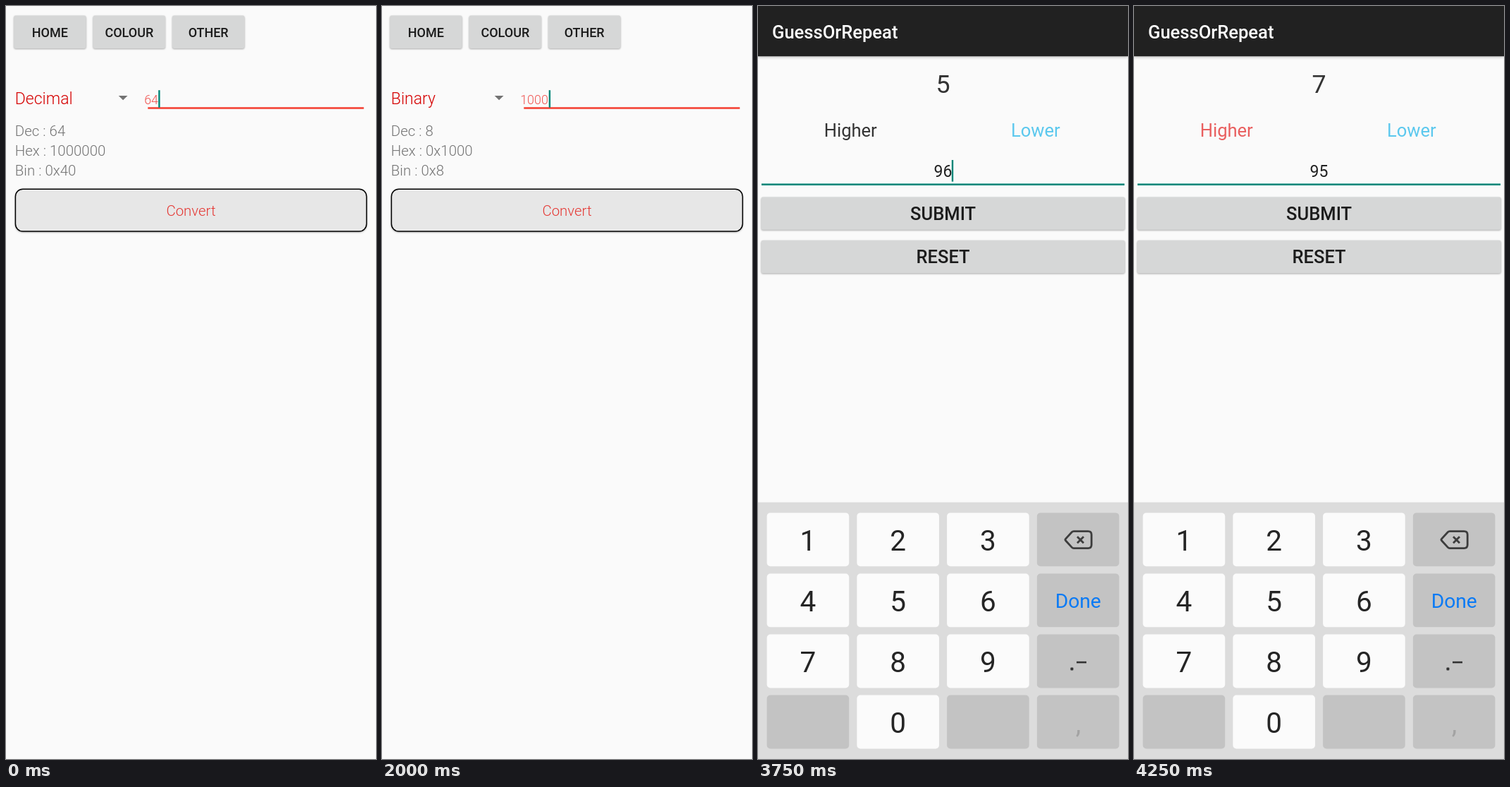
Recreate the animation shown at these times as an HTML page. Size 525 px wide and 1066 px high, loop 4.5 s.

```html
<!DOCTYPE html>
<html lang="en">
<head>
<meta charset="utf-8">
<title>Number tools</title>
<style>
  html, body { margin: 0; width: 100%; height: 100%; overflow: hidden; background: #fafafa; }
  svg { display: block; width: 100%; height: 100%; font-family: Roboto, sans-serif; }
  .mid { text-anchor: middle; }
  .light { font-weight: 300; }
  .btn { fill: #d6d7d7; filter: drop-shadow(0 1px 1.1px rgba(0, 0, 0, .32)); }
  .cap { fill: #1b1b1b; font-weight: 500; text-anchor: middle; }
  .accent { fill: #008577; }

  /* Each part shows for a share of the 4.5 s loop, shifted by its own delay. */
  .part { visibility: hidden; animation: 4500ms step-end infinite; }
  .t3000 { animation-name: t3000; }
  .t1500 { animation-name: t1500; }
  .t1000 { animation-name: t1000; }
  .t250 { animation-name: t250; }
  @keyframes t3000 { 0% { visibility: visible } 66.66667%, 100% { visibility: hidden } }
  @keyframes t1500 { 0% { visibility: visible } 33.33334%, 100% { visibility: hidden } }
  @keyframes t1000 { 0% { visibility: visible } 22.22223%, 100% { visibility: hidden } }
  @keyframes t250 { 0% { visibility: visible } 5.55556%, 100% { visibility: hidden } }
</style>
</head>
<body>
<svg id="stage" viewBox="0 0 525 1066"></svg>
<script>
const LOOP = 4500;

const text = (x, y, size, fill, str, cls = '') =>
  `<text x="${x}" y="${y}" font-size="${size}" fill="${fill}" class="${cls}">${str}</text>`;
const rect = (x, y, w, h, fill, r = 0) =>
  `<rect x="${x}" y="${y}" width="${w}" height="${h}" rx="${r}" fill="${fill}"/>`;
const button = (x, y, w, label, size, base) =>
  `<rect class="btn" x="${x}" y="${y}" width="${w}" height="46.4" rx="2.4"/>
   <text class="cap" x="${x + w / 2}" y="${base}" font-size="${size}">${label}</text>`;
const caret = (x, y, h) =>
  `<rect class="accent" x="${x}" y="${y}" width="2.4" height="${h}"/>`;
const part = (start, span, body) =>
  `<g class="part t${span}" style="animation-delay:${start - LOOP}ms">${body}</g>`;

// Converter screen
const converter = () =>
  rect(0, 0, 525, 1066, '#fafafa') +
  ['HOME', 'COLOUR', 'OTHER'].map((s, i) => button(11.2 + i * 112.4, 13.6, 102.4, s, 18, 43.6)).join('') +
  '<path d="M159.7 126.9h12.8l-6.4 6.4z" fill="#737373"/>' +
  rect(201.3, 143.2, 306.4, 2.6, '#f44336') +
  `<rect x="13.4" y="259.2" width="498.2" height="59.8" rx="10.5" fill="#e7e7e7" stroke="#000"
     stroke-width="1.5" style="filter:drop-shadow(0 1px 1.2px rgba(0,0,0,.28))"/>` +
  text(262.5, 297, 20.44, '#e53935', 'Convert', 'light mid');

const conversion = ([mode, input, caretX, dec, hex, bin], i) => part(i * 1000, 1000,
  text(12.8, 138.9, 23, '#d50000', mode, 'light') +
  text(196.2, 138.9, 17.88, '#ef5350', input, 'light') +
  caret(caretX, 119.2, 24.6) +
  [`Dec : ${dec}`, `Hex : ${hex}`, `Bin : ${bin}`]
    .map((s, n) => text(12.8, 184.3 + n * 27.7, 20.44, '#737373', s, 'light')).join(''));

const conversions = [
  ['Decimal', '64', 216.2, '64', '1000000', '0x40'],
  ['Hexadecimal', '0x25', 235.2, '37', '0x25', '100101'],
  ['Binary', '1000', 236.7, '8', '0x1000', '0x8'],
];

// Guessing game screen
const keyX = c => 12.6 + c * 127.75;
const keyY = r => 717.4 + r * 86.05;
const key = (label, c, r) => {
  const plain = /\d/.test(label);
  return rect(keyX(c), keyY(r), 116.6, 75.9, plain ? '#fbfbfb' : '#c3c3c3', 5) +
    (plain ? text(keyX(c) + 58.3, keyY(r) + 53.8, 40.5, '#252525', label, 'mid') : '');
};
const keypad = () =>
  rect(0, 702.6, 525, 363.4, '#dcdcdc') +
  ['123 ', '456 ', '789 ', ' 0  '].map((row, r) => [...row].map((s, c) => key(s, c, r)).join('')).join('') +
  `<g fill="none" stroke="#3d3d3d" stroke-width="2.8" stroke-linejoin="round">
     <path d="M448 743.6h20.4q4.8 0 4.8 4.8v14.4q0 4.8 -4.8 4.8h-20.4q-1.6 0 -2.7 -1.2l-8.8 -9.6q-1.1 -1.2 0 -2.4l8.8 -9.6q1.1 -1.2 2.7 -1.2z"/>
     <path d="M453 751.2l9 9m0 -9l-9 9"/>
   </g>` +
  text(454.2, 852.4, 28.2, '#0a7af5', 'Done', 'mid') +
  rect(443.4, 936.4, 4, 4, '#333', 1) + rect(452, 927.8, 14, 2.6, '#333') +
  text(454.6, 1029.4, 38, '#a3a3a3', ',', 'mid');

const game = () =>
  rect(0, 0, 525, 1066, '#fafafa') +
  `<rect y="-10" width="525" height="81.2" fill="#212121" style="filter:drop-shadow(0 1.5px 2px rgba(0,0,0,.28))"/>` +
  '<text x="20" y="45.8" font-size="25.55" font-weight="500" fill="#fff">GuessOrRepeat</text>' +
  '<rect class="accent" x="5" y="251.4" width="515" height="2.5"/>' +
  button(4.6, 270.4, 516, 'SUBMIT', 25.55, 303.1) +
  button(4.6, 331.8, 516, 'RESET', 25.55, 364.3) +
  keypad();

const guess = ([count, value, high, low, blink], i) => part(3000 + i * 250, 250,
  text(262.5, 122.8, 35.77, '#333', count, 'mid') +
  text(131.25, 185.2, 25.55, high ? '#e95f5f' : '#333', 'Higher', 'mid') +
  text(393.75, 185.2, 25.55, low ? '#5bc8ee' : '#333', 'Lower', 'mid') +
  text(262.5, 242.3, 23, '#212121', value, 'mid') +
  (blink ? caret(274.8, 218, 30.6) : ''));

const guesses = [
  [1, 50, 1, 0, 0],
  [2, 75, 1, 0, 0],
  [4, 90, 1, 0, 0],
  [5, 96, 0, 1, 1],
  [6, 94, 1, 0, 1],
  [7, 95, 1, 1, 0],
];

document.getElementById('stage').innerHTML =
  part(0, 3000, converter()) + conversions.map(conversion).join('') +
  part(3000, 1500, game()) + guesses.map(guess).join('');
</script>
</body>
</html>
```
